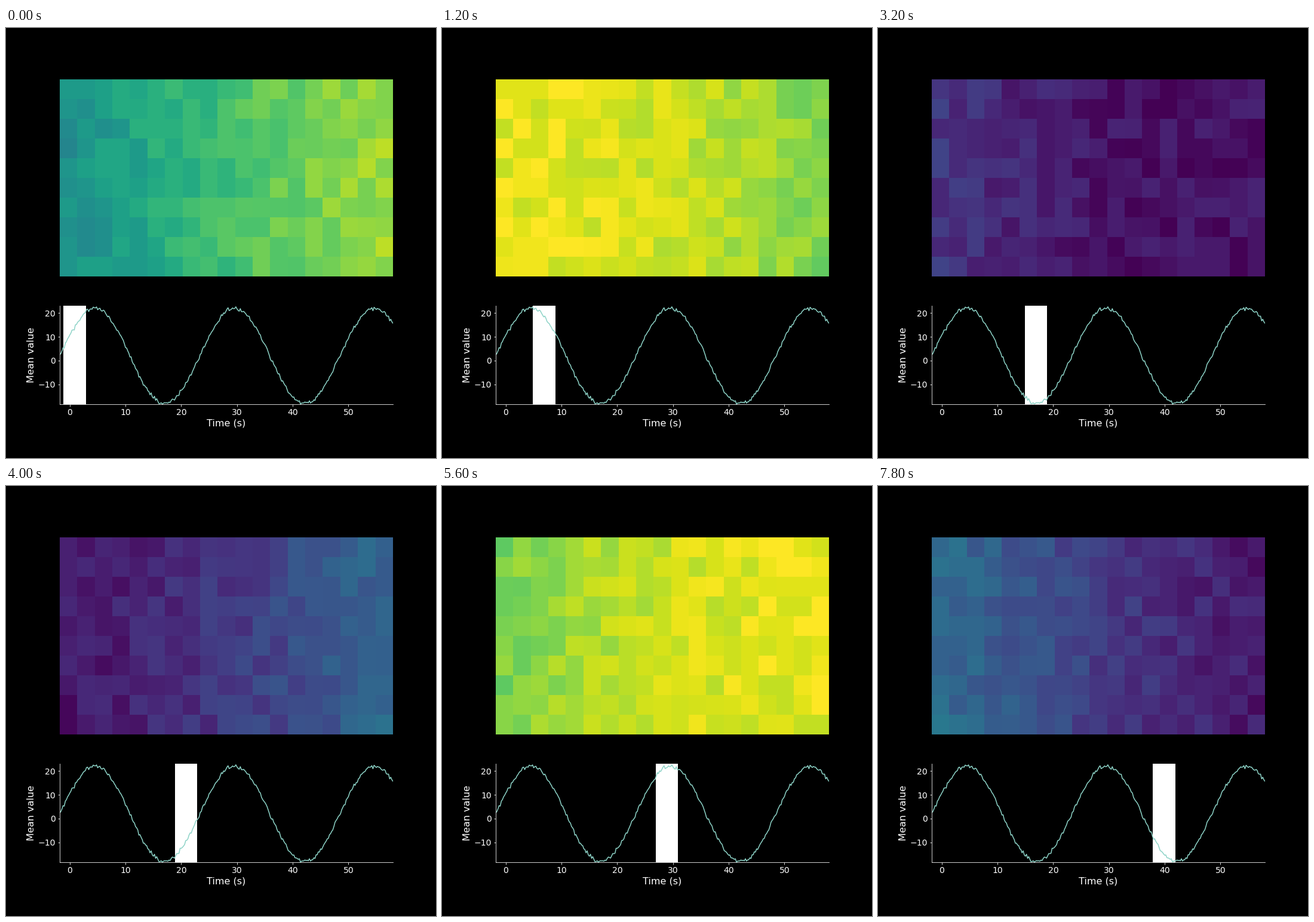
These frames come from a looping animation (720x720 px, 8 s). A matplotlib script:

```python
import matplotlib.pyplot as plt
import numpy as np
from matplotlib.animation import FuncAnimation

ROWS, SAMPLES, WINDOW = 10, 300, 19
STEP = 5          # samples scrolled per frame
DT = 0.2          # seconds per sample
FRAMES, INTERVAL = 40, 200
SPAN_START, SPAN_WIDTH = -1.11, 4

plt.style.use("dark_background")

# Slow sine shared by all rows, plus integer noise per cell
rng = np.random.default_rng(7)
k = np.arange(SAMPLES)
data = 20 * np.sin(k / 20) + rng.integers(0, 5, (ROWS, SAMPLES))
time = (k - WINDOW // 2) * DT

fig, (heat, trace) = plt.subplots(
    2, 1, figsize=(10, 10), dpi=72,
    gridspec_kw=dict(height_ratios=[2, 1], left=0.125, right=0.9,
                     bottom=0.125, top=0.88, hspace=0.2))

heat.axis("off")
image = heat.imshow(data[:, :WINDOW], cmap="viridis", vmin=-20, vmax=24,
                    aspect="auto", interpolation="nearest")

trace.plot(time, data.mean(axis=0), color="#8dd3c7", lw=1.5, zorder=2)
span = plt.Rectangle((SPAN_START, 0), SPAN_WIDTH, 1, color="white", lw=0,
                     transform=trace.get_xaxis_transform(), zorder=1)
trace.add_patch(span)
trace.set_xlim(time[0], time[-1])
trace.set_ylim(-18.36, 23.07)
trace.set_xticks(range(0, 51, 10))
trace.set_yticks(range(-10, 21, 10))
trace.tick_params(labelsize=14)
trace.set_xlabel("Time (s)", fontsize=16)
trace.set_ylabel("Mean value", fontsize=16)
trace.spines[["top", "right"]].set_visible(False)


def update(i):
    start = i * STEP
    image.set_data(data[:, start:start + WINDOW])
    span.set_x(SPAN_START + start * DT)
    return image, span


anim = FuncAnimation(fig, update, frames=FRAMES, interval=INTERVAL,
                     init_func=lambda: update(0), repeat=True, repeat_delay=0)
plt.show()
```
